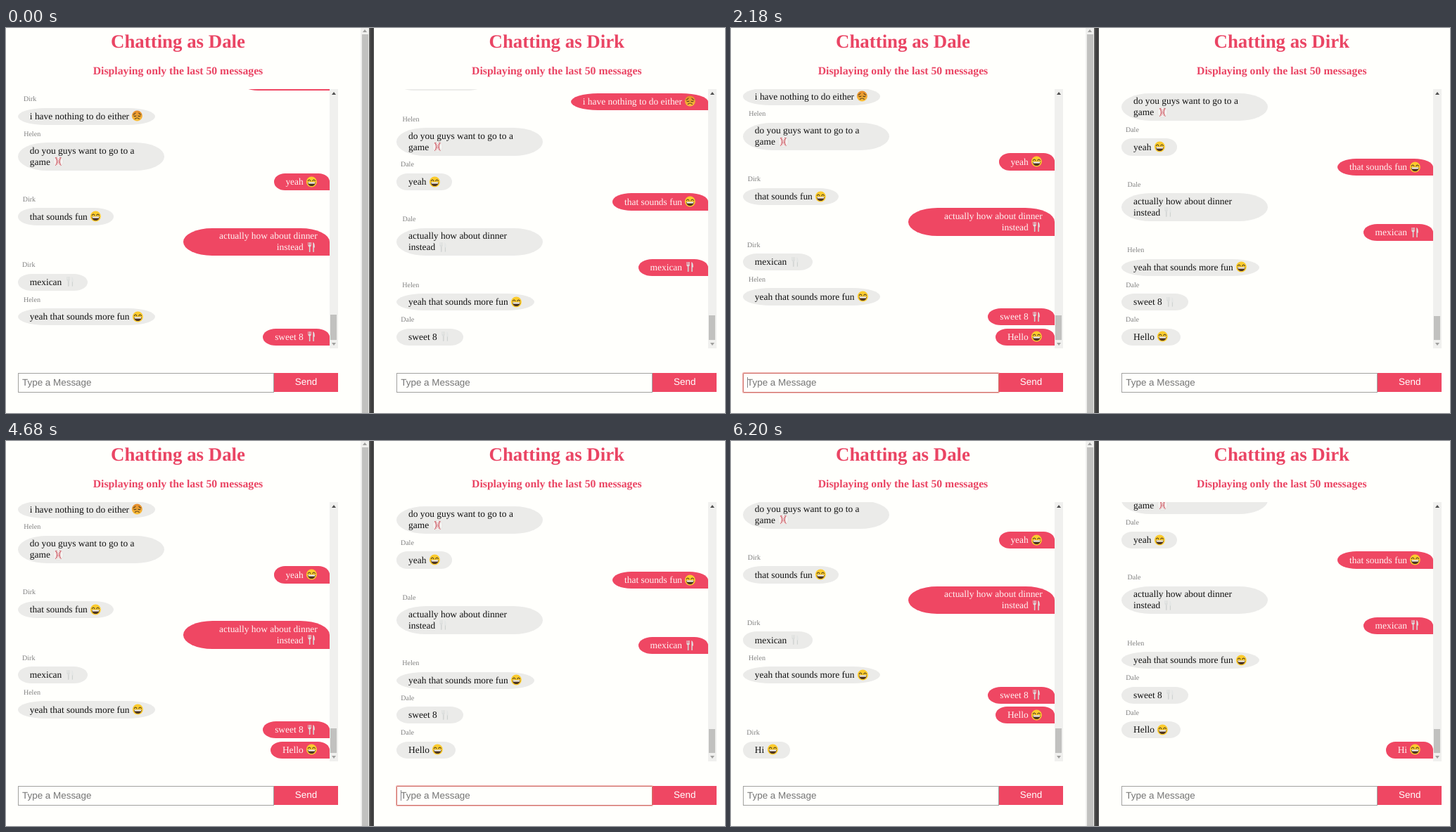
These frames come from a looping animation (1022x548 px, 8000 ms). An HTML page:

```html
<!DOCTYPE html>
<html lang="en">
<head>
<meta charset="utf-8">
<title>Two chat windows</title>
<style>
  html, body { margin: 0; width: 100%; height: 100%; overflow: hidden; }
  body {
    position: relative; background: #fffffc; color: #111;
    font: 13.43px/15.95px "Liberation Serif", "Times New Roman", serif;
    text-rendering: geometricPrecision;
  }
  .panel, .panel > *, .edge, .edge > * { position: absolute; box-sizing: border-box; }
  .panel { top: 0; width: 490px; height: 548px; }
  h1, h3 { left: 17px; width: 455px; margin: 0; text-align: center; color: #ea4564; white-space: nowrap; }
  h1 { top: 4px; font-size: 26.86px; line-height: 30px; }
  h3 { top: 52.6px; font-size: 15.72px; line-height: 18px; }

  .chat {
    left: 17px; top: 86.7px; width: 442.6px; height: 369.4px; overflow: hidden;
    display: flex; flex-direction: column; justify-content: flex-end; align-items: flex-start;
  }
  .msg { flex: none; margin-bottom: 4.2px; }
  .msg.own { align-self: flex-end; text-align: right; }
  .name {
    position: relative; top: -.5px; margin-left: calc(4px + 2%); height: 20.98px;
    font-size: 10.07px; line-height: 20.98px; color: #808080;
  }
  .bubble {
    box-sizing: border-box; height: 24.35px; padding: 4.34px 16.8px 0; white-space: nowrap;
    background: #ebebe9; border-radius: 20% / 50%;
  }
  .bubble.two { width: 207.6px; height: 39.46px; padding-top: 3.5px; }
  .own .bubble { background: #ef4763; color: #fff3f3; border-bottom-right-radius: 0; }
  .bubble svg { width: 16.7px; height: 16px; margin: -6px 0 -3.4px; }

  .bar { left: 459.6px; top: 86.7px; width: 12.4px; height: 369.4px; background: #f0f0ee; }
  .thumb { left: 461px; width: 9px; background: #c1c1bf; }
  .arrow { left: 462.5px; border: 3.2px solid transparent; }
  .up { top: 88.3px; border-bottom: 4px solid #505050; }
  .down { top: 448.2px; border-top: 4px solid #a0a09e; }

  .send {
    left: 381px; top: 491px; width: 91px; height: 27px; background: #ef4763; color: #fff;
    text-align: center; line-height: 26.6px;
  }
  .field {
    left: 17px; top: 491px; width: 364px; height: 28px; padding: 5px 0 0 5px;
    border: 1px solid #a2a2a0; line-height: 16px; white-space: pre;
  }
  .send, .field { font-family: "Liberation Sans", Arial, sans-serif; }
  .field.fading { border-color: #c08883; box-shadow: 0 0 0 1px rgba(226, 100, 92, .2); }
  .field.focus { border-color: #cf6e69; border-radius: 1px; box-shadow: 0 0 0 1px rgba(226, 100, 92, .42); }
  .hint { color: #757575; }
  .caret { position: absolute; top: 5px; width: 1px; height: 15px; background: #85858c; }

  .edge { left: 504px; top: 0; width: 19px; height: 548px; background: #f0f0ee; }
  .edge .track { left: 2px; top: 9px; width: 9px; height: 539px; background: #c1c1bf; }
  .edge .tip { left: 3.4px; top: -1px; border: 3.2px solid transparent; border-bottom: 4px solid #a0a09e; }
  .edge .frame { left: 12px; top: 0; width: 7px; height: 548px; background: linear-gradient(90deg, #6c6c6a, #444 30%, #3b3b3b 75%, #555); }
</style>
</head>
<body>
<svg width="0" height="0" style="position:absolute">
  <linearGradient id="warm" x2="0" y2="1">
    <stop offset="0" stop-color="#e58a2b"/><stop offset="1" stop-color="#fbc23a"/>
  </linearGradient>
  <symbol id="grin" viewBox="0 0 32 32">
    <circle cx="16" cy="16" r="15" fill="#fbcb2d"/>
    <path d="M6 13q3.5-6 7 0M19 13q3.5-6 7 0" fill="none" stroke="#4b3a20" stroke-width="2.4" stroke-linecap="round"/>
    <path d="M5 17h22c0 7-5 11-11 11S5 24 5 17z" fill="#4d3420"/>
    <path d="M6 17h20l-1 4H7z" fill="#fff"/>
  </symbol>
  <symbol id="sad" viewBox="0 0 32 32">
    <circle cx="16" cy="16" r="15" fill="url(#warm)"/>
    <path d="M5 12q4 0 6-4M27 12q-4 0-6-4M7 16q3 3 6 0M19 16q3 3 6 0M10 25q6-6 12 0" fill="none" stroke="#59401f" stroke-width="2.2" stroke-linecap="round"/>
  </symbol>
  <symbol id="ball" viewBox="0 0 32 32">
    <circle cx="16" cy="16" r="14.5" fill="#f4f2f0" stroke="#d9d8d6"/>
    <g fill="none" stroke="#c8434f">
      <path d="M8 4q8 12 0 24M24 4q-8 12 0 24" stroke-width="1.6"/>
      <path d="M10 5q8 11 0 22M22 5q-8 11 0 22" stroke-width="4.5" stroke-dasharray="1.3 2.6"/>
    </g>
  </symbol>
  <symbol id="fork" viewBox="0 0 32 32">
    <path d="M6 2v8q0 4 3 5v14q1.5 2 3 0V15q3-1 3-5V2h-1.6v8h-1.5V2H9.200v8H7.600V2z" fill="#dcdedd"/>
    <path d="M20 2q5 1 5 15h-2v12q-1.500 2-3 0z" fill="#e4e6e5"/>
    <path d="M11.400 15v14M22.400 17v12" stroke="#b9bcbb" stroke-width="1"/>
  </symbol>
</svg>
<script>
  const LOOP = 8000, HINT = 'Type a Message';
  const USERS = ['Dale', 'Dirk'], GUEST = 'Helen';
  const [A, B] = USERS;

  // sender, text, emoji, time of arrival
  const MESSAGES = [
    [A, 'i am so bored', 'sad', 0],
    [B, 'i have nothing to do either', 'sad', 0],
    [GUEST, 'do you guys want to go to a<br>game', 'ball', 0],
    [A, 'yeah', 'grin', 0],
    [B, 'that sounds fun', 'grin', 0],
    [A, 'actually how about dinner<br>instead', 'fork', 0],
    [B, 'mexican', 'fork', 0],
    [GUEST, 'yeah that sounds more fun', 'grin', 0],
    [A, 'sweet 8', 'fork', 0],
    [A, 'Hello', 'grin', 2180],
    [B, 'Hi', 'grin', 4740]
  ];

  // time, typed text, focus style, caret shown
  const TYPING = [
    [
      [0, '', '', 0], [440, '', 'focus', 1], [1060, 'H', 'focus', 1], [1240, 'He', 'focus', 1],
      [1360, 'Hel', 'focus', 1], [1480, 'Hell', 'focus', 1], [1700, 'Hello', 'focus', 1],
      [2080, '', 'focus', 1], [2820, '', 'focus', 0], [3540, '', '', 0]
    ],
    [
      [0, '', '', 0], [3540, '', 'focus', 1], [4160, 'H', 'focus', 1], [4340, 'Hi', 'focus', 1],
      [4680, '', 'focus', 1], [5420, '', 'focus', 0], [6120, '', 'fading', 0], [6200, '', '', 0]
    ]
  ];

  function add(parent, cls, html = '', tag = 'div') {
    const el = document.createElement(tag);
    el.className = cls;
    el.innerHTML = html;
    return parent.appendChild(el);
  }

  function addMessage(chat, user, [from, text, icon, at]) {
    const own = from === user;
    const el = add(chat, own ? 'msg own' : 'msg');
    if (!own) add(el, 'name', from);
    add(el, text.includes('<br>') ? 'bubble two' : 'bubble',
      `${text} <svg><use href="#${icon}"/></svg>`);
    return { el, at };
  }

  function makePanel(user, i) {
    const box = add(document.body, 'panel');
    box.style.left = i * 538.3 + 'px';
    add(box, '', 'Chatting as ' + user, 'h1');
    add(box, '', 'Displaying only the last 50 messages', 'h3');
    const chat = add(box, 'chat');
    const rows = MESSAGES.map(m => addMessage(chat, user, m));
    add(box, 'bar');
    const thumb = add(box, 'thumb');
    add(box, 'arrow up');
    add(box, 'arrow down');
    add(box, 'send', 'Send');
    const field = add(box, 'field');
    const text = add(field, '', '', 'span');
    const caret = add(field, 'caret', '', 'span');
    return { rows, thumb, field, text, caret, steps: TYPING[i], base: 408 + i };
  }

  const panels = USERS.map(makePanel);
  add(document.body, 'edge',
    '<div class="track"></div><div class="tip"></div><div class="frame"></div>');

  function drawPanel(p, t) {
    for (const { el, at } of p.rows) el.style.display = t >= at ? '' : 'none';
    const top = p.base + (t >= 2180 ? 1 : 0);
    p.thumb.style.top = top + 'px';
    p.thumb.style.height = 444 - top + 'px';

    const [, typed, focus, caret] = p.steps.findLast(s => s[0] <= t);
    p.field.className = 'field ' + focus;
    p.text.className = typed ? '' : 'hint';
    p.text.textContent = typed || HINT;
    p.caret.style.display = caret ? '' : 'none';
    p.caret.style.left = 5 + (typed ? p.text.getBoundingClientRect().width : 0) + 'px';
  }

  let start;
  function tick(now) {
    start ??= now;
    const t = (now - start) % LOOP;
    panels.forEach(p => drawPanel(p, t));
    requestAnimationFrame(tick);
  }
  requestAnimationFrame(tick);
</script>
</body>
</html>
```
